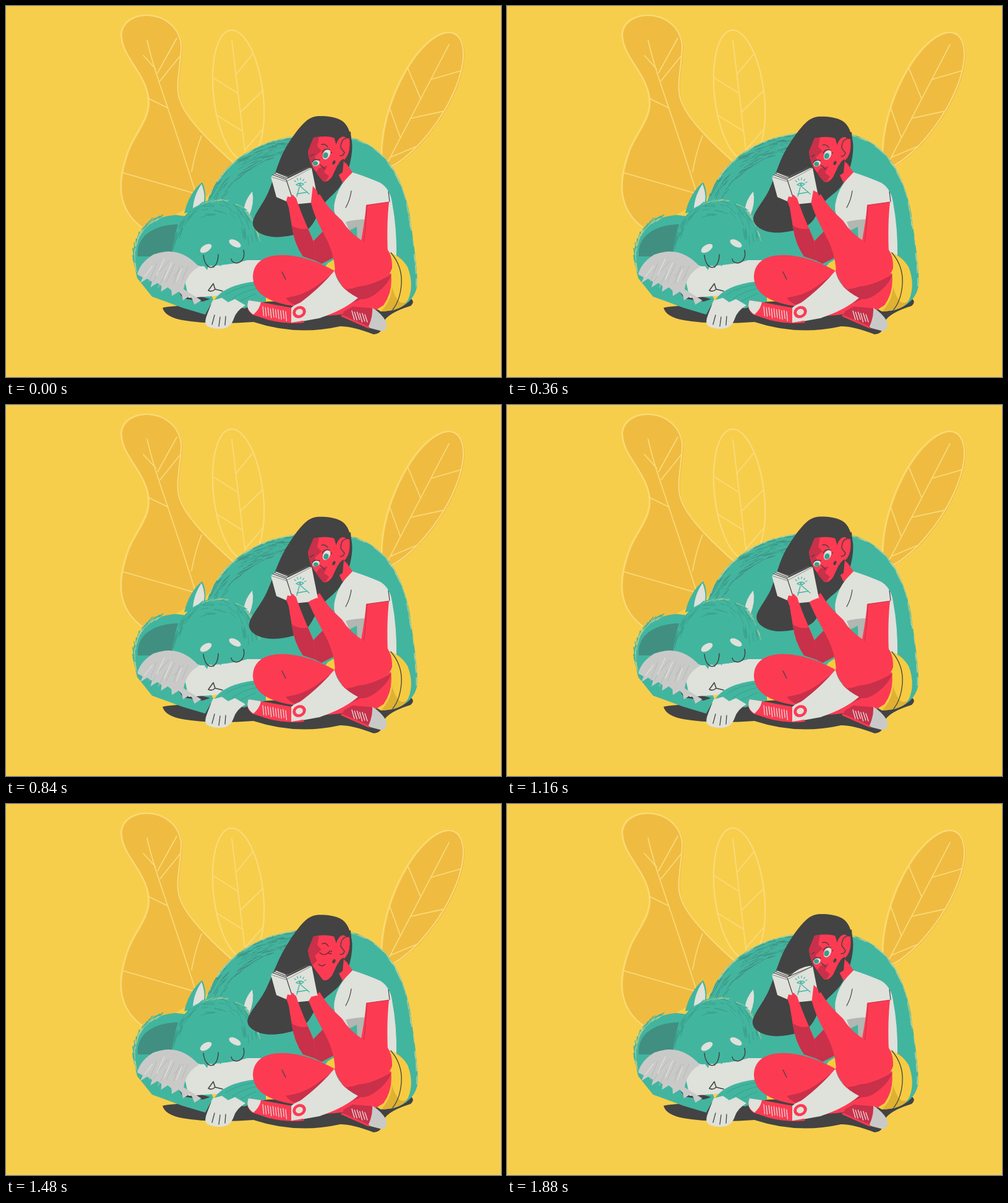
Animation, 800 px wide and 600 px high, one loop 1.92 s. Source, as an HTML page:

```html
<!DOCTYPE html>
<html lang="en">
<head>
<meta charset="utf-8">
<title>Reading with a sleepy friend</title>
<style>
html, body { margin: 0; width: 100%; height: 100%; overflow: hidden; background: #f7ce4b; }
svg { display: block; width: 800px; height: 600px; }
</style>
</head>
<body>
<svg id="stage" viewBox="0 0 800 600" stroke-linecap="round" stroke-linejoin="round"></svg>
<script>
const LOOP = 1920, STEP = 40, TAU = Math.PI * 2;
const C = {
  leaf: '#efbc41', vein: '#fbdb7f', teal: '#42b59f', mid: '#399f8c', deep: '#418f80', rim: '#b5cd92',
  dark: '#434343', white: '#dfe1db', grey: '#c9cac8', shade: '#b4b6b1',
  red: '#fc3b53', wine: '#c9304a', yellow: '#f6cb41', ochre: '#dfb132'
};
const stage = document.getElementById('stage');
const clamp = (v, lo = 0, hi = 1) => Math.max(lo, Math.min(hi, v));
const wave = turns => Math.cos(TAU * turns);

function el(tag, attrs, parent = stage) {
  const node = document.createElementNS('http://www.w3.org/2000/svg', tag);
  for (const k in attrs) node.setAttribute(k, attrs[k]);
  parent.appendChild(node);
  return node;
}
const group = parent => el('g', {}, parent);
const shape = (d, fill, parent) => el('path', { d, fill }, parent);
const line = (d, stroke, width, parent) =>
  el('path', { d, fill: 'none', stroke, 'stroke-width': width }, parent);
const oval = (cx, cy, rx, ry, turn, fill, parent) =>
  el('ellipse', { cx, cy, rx, ry, fill, transform: `rotate(${turn} ${cx} ${cy})` }, parent);
const show = (node, on) => node.setAttribute('visibility', on ? 'visible' : 'hidden');

let seed = 11;
const rand = () => (seed = seed * 16807 % 2147483647) / 2147483647;

// Closed smooth curve through points
function smooth(pts) {
  const n = pts.length, at = i => pts[(i + n) % n];
  let d = `M${at(0)}`;
  for (let i = 0; i < n; i++) {
    const [a, b, c, e] = [-1, 0, 1, 2].map(k => at(i + k));
    d += 'C' + [0, 1].map(k => b[k] + (c[k] - a[k]) / 6) +
         ' ' + [0, 1].map(k => c[k] - (e[k] - b[k]) / 6) + ' ' + c;
  }
  return d + 'Z';
}

// Random brush hairs along part of a clockwise path, up to `inset` inside it
function fur(path, from, to, count, stroke, { width = 1, len = 12, inset = 2, lean = 0.2 } = {}, parent) {
  const total = path.getTotalLength();
  let d = '';
  for (let i = 0; i < count; i++) {
    const s = (from + (to - from) * rand()) * total;
    const p = path.getPointAtLength(s), q = path.getPointAtLength(s + 1);
    const a = Math.atan2(q.y - p.y, q.x - p.x), k = inset * rand();
    const l = len * (0.5 + rand() * 0.8), b = a + lean * (0.5 + rand());
    d += `M${p.x - Math.sin(a) * k} ${p.y + Math.cos(a) * k}l${Math.cos(b) * l} ${Math.sin(b) * l}`;
  }
  line(d, stroke, width, parent);
}

// Parallel short strokes
function ticks(x, y, n, dx, dy, lx, ly) {
  let d = '';
  for (let i = 0; i < n; i++) d += `M${x + i * dx} ${y + i * dy + i % 2}l${lx} ${ly - i % 3}`;
  line(d, C.white, 1.3);
}

// Leaf from base to tip; a larger `taper` narrows the base
function leaf(bx, by, tx, ty, half, taper, fill) {
  const len = Math.hypot(tx - bx, ty - by), ux = (tx - bx) / len, uy = (ty - by) / len;
  const peak = taper / (taper + 0.5);
  const bulge = t => t ** taper * (1 - t) ** 0.5;
  const at = (t, side) => {
    const w = side * half * bulge(t) / bulge(peak);
    return [bx + (tx - bx) * t - uy * w, by + (ty - by) * t + ux * w];
  };
  const rim = [];
  for (let i = 0; i < 32; i++) {
    const a = i / 32 * TAU;
    rim.push(at((1 - Math.cos(a)) / 2, i < 16 ? -1 : 1));
  }
  const d = smooth(rim);
  if (fill) el('path', { d, fill, transform: 'translate(2 1)' });
  line(d, C.vein, 2);
  let veins = `M${at(0, 0)}L${at(0.92, 0)}`;
  for (let i = 0; i < 5; i++) {
    const t = 0.08 + i * 0.145;
    veins += `M${at(t, 0)}L${at(t + 0.14, i % 2 ? -0.97 : 0.97)}`;
  }
  line(veins, C.vein, 1.6);
}

// Leaves
const gourd = 'M225 362C175 328 180 280 199 230C215 195 238 175 228 138C218 102 186 78 186 45' +
  'C190 2 275 3 283 62C284 90 272 130 281 152C290 182 335 225 368 254';
shape(gourd + 'L320 310Z', C.leaf).setAttribute('transform', 'translate(2 1)');
line(gourd, C.vein, 2);
line('M228 55C240 110 262 160 307 304M276 52L245 108M282 80L249 121M222 80L242 102' +
  'M229 149L262 165M316 210Q306 235 300 268M190 270L322 308', C.vein, 1.6);
leaf(388, 250, 363, 39, 40, 0.5);
leaf(612, 262, 725, 45, 43, 0.7, C.leaf);

// Ground shadow
shape('M253 488Q270 484 340 482L640 468Q666 474 654 485Q612 498 608 516Q608 530 594 531' +
  'Q560 518 540 518Q470 534 400 511Q330 516 285 508Q257 503 253 488Z', C.dark);

// Sleeping animal: back
const back = group();
const rump = shape('M322 330C335 265 395 211 500 207C605 202 638 265 652 335' +
  'C659 385 667 435 664 455Q658 482 626 492L400 460Z', C.teal, back);
fur(rump, 0.02, 0.22, 110, C.deep, { len: 17, inset: 26, lean: 0.15 }, back);
fur(rump, 0.02, 0.22, 60, C.teal, { len: 18, inset: 30 }, back);
fur(rump, 0.02, 0.22, 50, C.rim, { len: 10, lean: -0.05 }, back);
fur(rump, 0.28, 0.56, 70, C.rim, { len: 11, lean: 0.03 }, back);

// Sleeping animal: tail and far arm
const tail = shape('M212 440C198 385 215 342 275 338L305 342L310 420L335 475L322 499L285 488L236 470Z', C.teal);
shape('M213 405C210 375 235 354 278 353Q270 378 270 405Z', C.deep);
fur(tail, 0.02, 0.24, 60, C.teal, { width: 1.4, len: 13, lean: -0.15 });
fur(tail, 0.02, 0.24, 30, C.rim, { len: 9, lean: -0.05 });
shape('M278 460L330 474L318 478L286 473Z', C.dark);

// Sleeping animal: head
shape('M288 335Q296 302 317 285Q326 302 320 330Z', C.teal);
shape('M316 288Q324 308 318 323L302 335Q301 310 316 288Z', C.white);
shape('M381 330Q386 306 399 297Q403 318 396 342Z', C.teal);
shape('M398 300Q402 318 393 339L384 330Q387 312 398 300Z', C.white);
const head = shape('M268 402C274 352 290 318 345 314C390 312 418 365 408 415L380 430L310 430Z', C.teal);
fur(head, 0.2, 0.55, 45, C.mid, { len: 12, inset: 22, lean: 0.3 });
fur(head, 0.02, 0.2, 30, C.mid, { len: 13, inset: 8, lean: 0.1 });
fur(head, 0.22, 0.56, 40, C.teal, { width: 1.3, len: 11, lean: -0.25 });
fur(head, 0.22, 0.56, 22, C.rim, { width: 0.8, len: 10, lean: -0.12 });
shape('M286 430Q298 414 314 421Q360 420 390 411H412V446Q385 448 350 468L295 472Z', C.white);
let fringe = 'M318 418';
for (let i = 0; i < 7; i++) fringe += `l7 ${9 - i}l4 ${i - 11}`;
shape(fringe + 'L395 402L320 400Z', C.teal);
oval(323, 392, 10.5, 5.5, -32, C.white);
oval(370, 384, 10.5, 5.2, 28, C.white);
line('M319 403C322 431 343 428 343 402M364 409C366 421 389 417 384 395', C.dark, 1.5);
line('M335 449L327 460Q333 463 338 458L335 449M338 458L350 461', C.dark, 1.6);

// Sleeping animal: tail tip, seen as a brush
let tuft = 'M312 422Q280 386 238 402Q217 415 212 434';
for (let i = 0; i < 6; i++) tuft += `l${9 - i} 5l${-4 + i * 1.5} 9l11 -7`;
shape(tuft + 'L287 458Q292 432 312 422Z', C.grey);
for (let i = 0; i < 12; i++) {
  const x = 236 + i * 5 + rand() * 5, y = 408 + rand() * 22;
  line(`M${x} ${y}l${-8 - rand() * 7} ${16 + rand() * 14}`, i % 3 ? '#b9bbb9' : '#e4e5e1', 1.1);
}

// Sleeping animal: near arm
shape('M420 444Q350 448 334 480L385 489L420 478Z', C.teal);
line('M412 449Q375 453 355 467M410 456Q382 461 366 473M404 465L379 477', C.mid, 1);
shape('M334 476L349 472L359 479L370 474L387 484Q372 493 368 506Q364 518 354 521Q339 524 326 518Q319 514 325 499Z', C.white);
line('M337 500L333 515M346 503L344 518M355 502L354 516', C.dark, 1.3);

// Hair: lower left points swing, the rest nods with the head
const hairPts = [[513, 178], [546, 188], [559, 220], [555, 258], [540, 291], [512, 318],
  [486, 355], [430, 366], [399, 345], [424, 297], [449, 235], [484, 187]];
const hairWeight = (x, y) => clamp((y - 235) / 110) * clamp((550 - x) / 50);
const hair = shape('', C.dark);

// Shirt and shorts
shape('M547 283L557 268Q585 277 605 286Q621 296 624 318Q632 360 631 407L575 402L554 388L556 368Q541 355 535 344Q527 331 532 314Q536 297 547 283Z', C.white);
shape('M549 349Q566 345 582 345L580 386L564 386L554 362Z', C.shade);
shape('M555 363L567 357L568 389L555 386Z', C.teal);
line('M558 299Q556 314 549 326M618 300L620 316', C.dark, 1.2);
shape('M612 396Q636 401 649 422Q660 450 650 475Q640 493 606 494L592 486Z', C.yellow);
shape('M624 455Q622 478 606 494Q640 492 648 478Q634 488 624 455Z', C.ochre);
line('M622 399Q641 421 639 450Q637 476 625 491', C.dark, 1.3);
shape('M508 433L520 416L540 404L536 433Z', C.yellow);

// Neck and face
shape('M538 244L551 256L560 269L544 286L537 272Z', C.red);
const face = group();
shape('M497 213Q520 208 535 215L555 214Q558 240 545 250L536 257L527 276Q519 287 512 283L497 263Q489 249 488 235Z', C.red, face);
shape('M497 213L488 235Q489 248 496 259L503 252L499 244L510 234L503 227L506 212Z', C.wine, face);
shape('M530 212L557 203L558 216L547 210L534 225Z', C.dark, face);
oval(543, 228, 10, 17, 10, C.red, face);
line('M549 214Q541 216 541 229L547 237Q545 243 540 242', C.dark, 1.4, face);
shape('M546 247Q539 250 537 257L530 278L544 269Z', C.dark, face);
const awake = group(face);
shape('M506 262L520 258L514 269L522 275L516 284Q509 282 501 269Z', C.wine, awake);
oval(518, 240, 5.5, 8.5, 28, C.white, awake);
oval(501, 254, 6, 4.6, -25, C.white, awake);
const irises = group(awake);
oval(516.5, 241.5, 4, 5, 24, '#35a08d', irises);
oval(500, 254.5, 4, 3.6, 0, '#35a08d', irises);
line('M511 237Q514 230 523 232M495 252Q498 247 507 249M510 224Q516 222 520 228M492 243L497 240M508 257L515 263', C.dark, 1.4, awake);
const asleep = group(face);
line('M507 239Q514 247 524 236M521 240L526 241M511 225Q517 222 521 229M505 258Q511 263 516 258', '#702b3a', 1.4, asleep);
oval(530, 253, 2.2, 3.6, 25, C.dark, face);
oval(526, 237, 1.1, 1.1, 0, C.dark, face);

// Far arm
shape('M497 380L529 347Q544 357 549 369L545 399L510 417L481 402Z', C.wine);
shape('M455 314L461 307L469 311Q476 332 486 355L497 380L501 412L480 405Q466 385 462 357Z', C.red);
shape('M462 355Q475 363 488 360L497 382L501 412L480 405Q465 383 462 355Z', C.wine);

// Legs
shape('M399 438C400 390 475 395 534 430L518 458Q500 478 480 487Q400 480 399 438Z', C.red);
shape('M452 472Q480 468 500 454L533 429L520 461L482 487Q462 485 452 472Z', C.wine);
line('M446 430L452 442', C.dark, 1.3);
shape('M540 452L622 432Q626 462 610 484L594 494L520 501L490 501Z', C.red);
shape('M540 454L600 449Q588 470 560 480L520 501L490 501Z', C.wine);
shape('M531 428Q535 455 569 472Q546 492 506 505L462 513Q451 503 470 484Q506 458 531 428Z', C.white);
shape('M531 428Q540 400 575 382L605 383Q625 395 624 424Q616 449 568 454L552 460Q535 447 531 428Z', C.red);
shape('M550 458Q590 454 623 434Q617 452 594 468Q577 478 569 472Z', C.wine);

// Shoes
shape('M392 476L412 479L467 489L482 512Q455 515 425 508L398 499Q386 490 392 476Z', C.red);
shape('M392 476L412 479Q410 490 400 499Q386 490 392 476Z', C.white);
ticks(415, 486, 10, 4.1, 0.8, 1.5, 15);
shape('M461 488Q473 477 500 476L507 499Q488 509 461 512Z', C.white);
oval(474, 495, 11, 9.5, -25, C.red);
oval(474, 495, 6, 5, -25, C.white);
shape('M546 494L560 486L596 489L594 522L571 514L543 502Z', C.wine);
shape('M592 488Q607 497 614 510Q618 523 608 526L585 520Q593 504 592 488Z', C.grey);
line('M543 501L586 520', C.red, 3);
ticks(559, 493, 6, 4.2, 1, 4, 14);

// Near arm, then the book it holds
shape('M582 322L619 317Q615 352 617 400L600 422L570 400Q580 350 582 322Z', C.red);
line('M583 323Q582 355 578 382M583 322L619 317', C.wine, 1.2);
const forearm = shape('', C.red);
const book = group();
shape('M428 276L437 269L456 276L487 261L494 262L505 317L465 321L437 309Z', C.white, book);
line('M431 273L453 281L466 321M437 269L456 277L488 261M434 271L454 279L491 261', C.dark, 1.2, book);
line('M428 276L453 284L494 262', '#777873', 0.8, book);
const page = el('path', { fill: C.white, stroke: C.dark, 'stroke-width': 1.1 }, book);
line('M474 293L470 308M476 292L490 304M470 304L487 301M469 289Q475 284 481 288Q476 293 469 289', C.teal, 1.4, book);
oval(475, 288.5, 1.5, 1.5, 0, C.teal, book);
for (let i = 0; i < 5; i++) {
  const a = -2.5 + i * 0.52, x = Math.cos(a), y = Math.sin(a);
  line(`M${475 + 8 * x} ${289 + 8 * y}l${3 * x} ${3 * y}`, C.teal, 1.2, book);
}
shape('M453 315L455 308L460 309L463 305L469 311L474 326L457 326Z', C.red);
const thumb = shape('', C.red);

function draw(t) {
  const p = t / LOOP, q = p * 2;

  // Two breaths per loop
  const breath = (1 - wave(q)) / 2;
  back.setAttribute('transform',
    `translate(500 492) scale(${1 + breath * 0.006} ${1 + breath * 0.02}) translate(-500 -492)`);

  // One slow nod; the hair tip circles behind the breath
  const nod = 1.4 * (1 - wave(p));
  const dx = 8 * wave(q - 0.18) - 3.5, dy = 6 - 7 * wave(q - 0.28);
  hair.setAttribute('d', smooth(hairPts.map(([x, y]) => {
    const w = hairWeight(x, y);
    return [x + dx * w, y + nod * (1 - w) + dy * w];
  })));
  face.setAttribute('transform', `translate(0 ${nod})`);
  irises.setAttribute('transform', `translate(${nod * 0.3} ${nod * 0.3})`);
  const shut = t >= 1400 && t < 1600;
  show(awake, !shut);
  show(asleep, shut);

  // Page turn near the end of the loop
  const u = clamp((t - 1360) / 520), turn = u * u * (3 - 2 * u);
  const x = 437 + 54 * turn, y = 269 - 8 * turn - 5 * Math.sin(Math.PI * turn);
  page.setAttribute('d', `M455 279Q${(x + 452) / 2} ${y + 2} ${x} ${y}l2 2Z`);
  show(page, turn > 0);

  // Thumb climbs the book edge for the turn
  const r = ((1 + wave(p - 0.05)) / 2) ** 2;
  thumb.setAttribute('d', `M${488 + 5 * r} 319L${493 + 3 * r} ${316 - 26 * r}L${503 - r} ${312 - 15 * r}L508 318L500 328Z`);
  forearm.setAttribute('d', `M${488 + 5 * r} 318L507 304Q518 325 543 347Q555 367 579 382L605 405L570 430L532 428` +
    `Q530 397 514 369Q499 343 ${488 + 5 * r} 318Z`);
}

const start = performance.now();
function tick() {
  const t = (performance.now() - start) % LOOP;
  draw(Math.floor(t / STEP) * STEP);
  requestAnimationFrame(tick);
}
draw(0);
requestAnimationFrame(tick);
</script>
</body>
</html>
```
